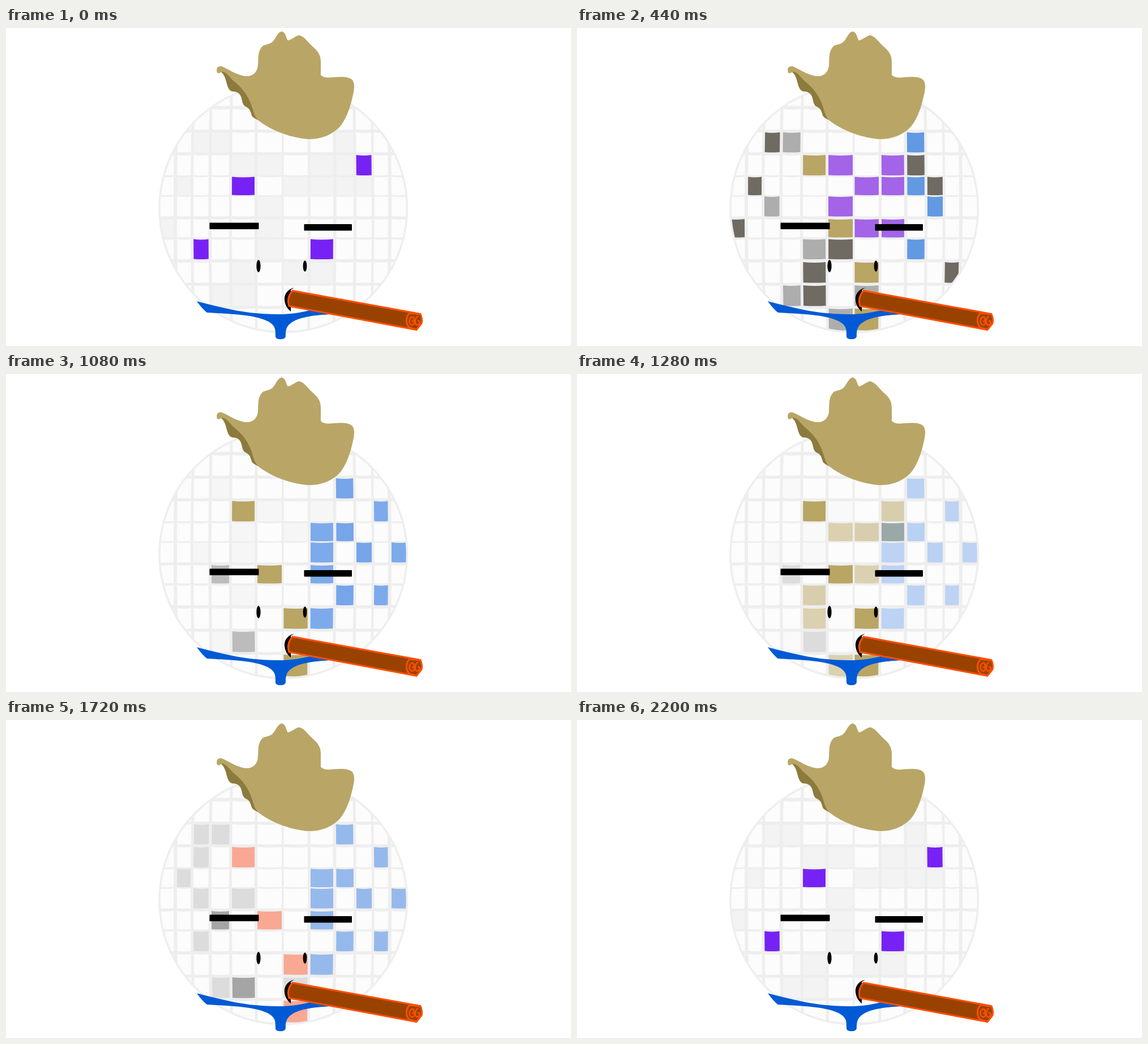
Recreate the animation shown at these times as an HTML page. Size 998 px wide and 561 px high, loop 2400 ms.

```html
<!DOCTYPE html>
<html lang="en">
<head>
<meta charset="utf-8">
<title>Disco ball cowboy</title>
<style>
  html, body { margin: 0; width: 100%; height: 100%; overflow: hidden; background: #fff; }
  svg { display: block; width: 100%; height: 100%; }
</style>
</head>
<body>
<svg viewBox="0 0 998 561">
  <clipPath id="ball"><circle cx="489.7" cy="318" r="217"/></clipPath>
  <circle cx="489.7" cy="318" r="220.5" fill="#eee"/>
  <g id="tiles" clip-path="url(#ball)"></g>

  <!-- hat -->
  <path fill="#8c7b3d" d="M374 75 C380 76 385 81 388 91 C391 102 393 111 400 112 C407 112 412 114 415 121 C418 129 417 136 424 139 C433 143 432 151 435 156 C439 160 444 161 452 167 L450 142 L416 92 L385 70Z"/>
  <path fill="#b9a666" d="M373 79 C370 70 376 65 384 69 C395 74 408 83 423 85 C437 86 444 77 445 66 C446 52 444 42 453 32 C459 28 466 30 472 23 C478 16 479 8 487 6 C495 8 494 17 498 22 C506 20 513 12 519 13 C528 16 533 25 542 33 C552 42 556 48 556 60 L556 83 C562 88 567 88 576 87 C590 86 606 85 612 92 C617 99 615 110 612 122 C607 145 598 166 588 176 C573 190 555 196 537 196 C507 195 470 182 447 164 C437 156 437 143 431 130 C425 116 416 105 405 96 C395 88 390 77 381 77 C378 79 376 81 373 79Z"/>

  <!-- bandana -->
  <path fill="#005ad5" d="M337 482 C352 486 368 490 386 494 C416 501 446 505 481 505 C510 505 530 500 548 495 L576 505 C547 506 520 510 507 518 C495 525 494 532 494 544 Q493 549 485 549 Q476 549 476 544 C476 532 476 527 467 520 C450 509 420 506 390 504 L355 502 Q347 496 337 482Z"/>

  <!-- face -->
  <rect x="359.5" y="343.5" width="87" height="11.5" rx="1"/>
  <rect x="526.5" y="346" width="84.5" height="11.5" rx="1"/>
  <ellipse cx="446" cy="420" rx="3.6" ry="11"/>
  <ellipse cx="528" cy="420" rx="3.4" ry="9.8"/>
  <path d="M509 458 C497 461 491 470 492 480 C493 490 498 496 503 500 L503 462Z"/>

  <!-- cigar -->
  <g stroke="#ff4f00" stroke-width="3" stroke-linejoin="round" fill="none">
    <path fill="#994200" d="M506 463.5 L732 504.5 Q736 514 734 521 L725 532.5 L500 490.5 Q495 476 506 463.5Z"/>
    <path d="M713 503 C705 510 706 525 714 529 M713 503 L732 505 M714 529 L725 532"/>
    <path stroke-width="2.5" d="M720 510 C711 508 710 524 718 524 C724 522 721 514 717 518 M728 508 C722 512 721 522 726 524 C732 524 732 514 727 517 M720 510 L722 523"/>
  </g>
</svg>
<script>
const LOOP = 2400, STEP = 40, CX = 489.7, CY = 318;
const BASE = '#fcfcfc', FAINT = '#f3f3f3', TAN = '#b9a564', GRAY = '#bcbcbc';

// tile edges: columns a to l, rows from the top of the ball
const COLS = [[264, 296], [302, 326], [331, 357.5], [363, 394], [399, 439], [444, 487],
  [490.5, 533], [538, 578], [583.5, 614], [619, 646], [650.5, 675], [681, 712]];
const ROWS = [[95, 137], [143, 179], [184, 219], [224, 259.5], [262.5, 294.5], [297, 332],
  [337, 369], [372.5, 407.5], [413, 449], [454, 490], [495, 533]];
const TOP = 2; // index of the row named 0

const FOUR = 'e1 f4 g6 g8', BLUES = 'i0 i2 j3 i5', WIDE = 'k1 h2 h3 l3 h4 k5 h6';
const VIOLETS = 'f1 h1 g2 h2 f3 g4 h4';
const start = {
  [FAINT]: 'c0 d0 i0 e1 f1 h1 i1 b2 g2 h2 i2 j2 f3 a4 f4 f5 e6 g6 h6 d7 e7',
  '#7722f4': 'e2 j1 c5 h5'
};
const poses = [
  [0, start],
  [200, start],
  [440, {
    '#6f6b62': 'c0 i1 b2 j2 a4 f5 e6 k6 e7', '#adadad': 'd0 c3 e5 d7 g7 f8',
    [TAN]: FOUR, '#a364e8': VIOLETS, '#6199e3': BLUES
  }],
  [880, {
    [GRAY]: 'd0 c3 c5 e5 d7 g7 f8', [TAN]: FOUR, '#b68aeb': VIOLETS,
    '#b07ce8': 'e2', '#6199e3': BLUES, '#f4f4f4': 'k1 h3 l3 k5 h6'
  }],
  [1080, {
    [TAN]: FOUR, '#76a5e9': BLUES, '#7daaeb': WIDE, [GRAY]: 'd4 e7',
    '#f6f6f6': 'd0 f1 h1 e2 g2 c3 e3 e5 d7'
  }],
  [1480, { [TAN]: FOUR + ' h1 f2 g2 h2 g4 e5 e6 f8' }],
  [1720, {
    '#96b9ec': BLUES + ' ' + WIDE, '#dcdcdc': 'c0 d0 c1 b2 c3 e3 c5 d7 g7',
    '#a5a5a5': 'd4 e7', '#f9a893': FOUR
  }],
  [2200, start],
  [LOOP, start]
];

const rgb = hex => [1, 3, 5].map(i => parseInt(hex.slice(i, i + 2), 16));

const keys = poses.map(([time, groups]) => {
  const fills = {};
  for (const [color, names] of Object.entries(groups))
    for (const name of names.split(' ')) fills[name] = rgb(color);
  return { time, fills };
});

// side edges lean in slightly toward the poles
const bend = (x, y) => x + (CX - x) * 0.02 * ((y - CY) / 220) ** 2;

function tilePath([x0, x1], [y0, y1]) {
  const mid = (x0 + x1) / 2;
  return `M${bend(x0, y0)} ${y0} Q${mid} ${y0 + 2} ${bend(x1, y0)} ${y0}` +
    `L${bend(x1, y1)} ${y1} Q${mid} ${y1 + 1} ${bend(x0, y1)} ${y1}Z`;
}

const layer = document.getElementById('tiles');
const tiles = ROWS.flatMap((row, r) => COLS.map((col, c) => {
  const node = document.createElementNS('http://www.w3.org/2000/svg', 'path');
  node.setAttribute('d', tilePath(col, row));
  node.setAttribute('fill', BASE);
  layer.append(node);
  return { node, name: 'abcdefghijkl'[c] + (r - TOP) };
}));

const blank = rgb(BASE);

function draw(ms) {
  const t = Math.floor((ms % LOOP) / STEP) * STEP;
  const i = keys.findIndex(k => k.time > t);
  const from = keys[i - 1], to = keys[i];
  const p = (t - from.time) / (to.time - from.time);
  for (const { node, name } of tiles) {
    const a = from.fills[name] || blank, b = to.fills[name] || blank;
    node.setAttribute('fill', `rgb(${a.map((v, n) => Math.round(v + (b[n] - v) * p))})`);
  }
}

const begin = performance.now();
function tick() {
  draw(performance.now() - begin);
  requestAnimationFrame(tick);
}
tick();
</script>
</body>
</html>
```
